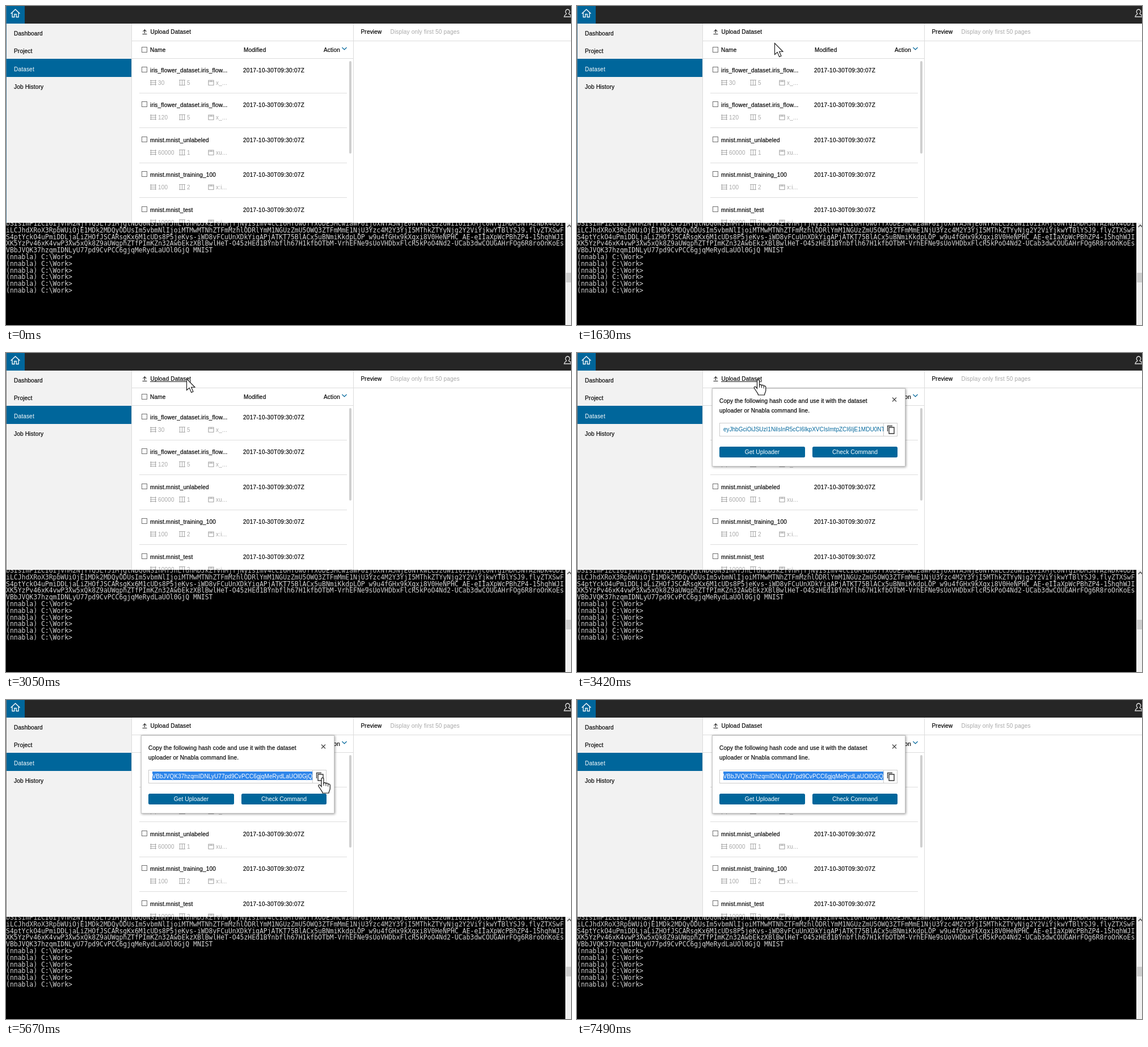
An HTML page that plays this animation: 996x562 px, repeating every 8 s.

```html
<!DOCTYPE html>
<html lang="en">
<head>
<meta charset="utf-8">
<title>Dataset upload</title>
<style>
html, body { margin: 0; width: 100%; height: 100%; overflow: hidden; background: #000; }
svg { display: block; width: 996px; height: 562px; }
text { font: 10px "Liberation Sans", Arial, sans-serif; white-space: pre; stroke-width: .2px; }
.ui { fill: #000; stroke: #000; letter-spacing: .2px; }
.name { fill: #000; stroke: #000; letter-spacing: .2px; }
.date { fill: #000; stroke: #000; letter-spacing: .29px; }
.meta { fill: #a8a8a8; letter-spacing: .2px; }
.white { fill: #fff; letter-spacing: .2px; }
.btn { fill: #fff; font-size: 10.35px; text-anchor: middle; }
.hash { fill: #00669b; }
.picked { fill: #fff; text-anchor: end; letter-spacing: .08px; }
.term { fill: #d6d6d6; font: 11.43px "DejaVu Sans Mono", monospace; }
</style>
</head>
<body>
<svg id="stage" viewBox="0 0 996 562"></svg>
<script>
const LOOP = 8000, BLUE = '#00669b';

const rect = (x, y, w, h, fill, more = '') =>
  `<rect x="${x}" y="${y}" width="${w}" height="${h}" fill="${fill}" ${more}/>`;
const line = (d, color, width = 1) =>
  `<path d="${d}" fill="none" stroke="${color}" stroke-width="${width}"/>`;
const text = (x, y, cls, s) => `<text x="${x}" y="${y}" class="${cls}">${s}</text>`;
const group = (id, body, more = '') => `<g id="${id}" ${more}>${body}</g>`;
const box = (x, y) => rect(x + .5, y + .5, 9, 9, '#fff', 'stroke="#707070"');

const prompt = '(nnabla) C:\\Work&gt;';
const output = [
  'bSIsImF1ZCI6IjVhM2NjYTQ5LTJiMjgtNDQ0NSIhMTJhLTdhMDJkZTVhMjTjNyIsImV4cCI6MTUwOTYxODE5MCwiaWF0IjoxNTA5NjE0NTkwLCJzdWIiOiIxMjc0NTg1MDM3NTA2NDk4ODI',
  'iLCJhdXRoX3RpbWUiOjE1MDk2MDQyODUsIm5vbmNlIjoiMTMwMTNhZTFmMzhlODRlYmM1NGUzZmU5OWQ3ZTFmMmE1NjU3Yzc4M2Y3YjI5MThkZTYyNjg2Y2ViYjkwYTBlYSJ9.flyZTXSwF',
  'S4ptYckO4uPmiDDLjaLiZHOfJSCARsgKx6M1cUDs8P5jeKvs-iWD8vFCuUnXDkYigAPjATKT75BlACx5uBNmiKkdpLOP_w9u4fGHx9kXqxi8V0HeNPHC_AE-eIIaXpWcPBhZP4-1ShqhWJI',
  'XK5YzPv46xK4vwP3Xw5xQk8Z9aUWqphZTfPImKZn32AwbEkzXBlBwlHeT-O45zHEd1BYnbflh67H1kfbOTbM-VrhEFNe9sUoVHDbxFlcR5kPoO4Nd2-UCab3dwCOUGAHrFOg6R8roOnKoEs',
  'VBbJVQK37hzqmIDNLyU77pd9CvPCC6gjqMeRydLaUOl0GjQ MNIST',
  ...Array(6).fill(prompt)
];
const rows = [
  ['iris_flower_dataset.iris_flow...', '30', '5', 'x_...'],
  ['iris_flower_dataset.iris_flow...', '120', '5', 'x_...'],
  ['mnist.mnist_unlabeled', '60000', '1', 'xu...'],
  ['mnist.mnist_training_100', '100', '2', 'x:i...'],
  ['mnist.mnist_test', '10000', '2', 'x:i...']
];
const ROW = 61.4;

function terminal() {
  return rect(0, 382, 996, 180, '#000') +
    output.map((s, i) => text(0, Math.round(387 + 11.8 * i), 'term', s)).join('') +
    rect(986, 382, 10, 180, '#f0f0f0') + rect(987, 470, 9, 17, '#cdcdcd') +
    line('M989.5 389.5l3.5-3.5l3.5 3.5', '#555', 1.6);
}

function datasetRow([name, count, columns, kind], i) {
  const icon = '#a8a8a8';
  return `<g transform="translate(0 ${Math.round(i * ROW)})">` +
    box(239, 107) + text(254, 117, 'name', name) + text(418, 117, 'date', '2017-10-30T09:30:07Z') +
    line('M255.5 130v10M263.5 130v10M254 131.5h11M254 135h11M254 138.5h11', icon) +
    line('M305 130.5h11M305 139.5h11M306.5 130v10M310.5 130v10M314.5 130v10', icon) +
    line('M357 131h9v8.5h-9zM357 133h9M361.5 131v3', icon, 1.2) +
    text(268, 139, 'meta', count) + text(319, 139, 'meta', columns) + text(370, 139, 'meta', kind) +
    line('M235 153.5H601', '#dedede') + '</g>';
}

function browser() {
  const menu = ['Dashboard', 'Project', 'Dataset', 'Job History'];
  return rect(0, 0, 996, 383, '#fff') + rect(0, 31, 221, 352, '#f2f2f2') +
    rect(0, 0, 996, 31, '#262626') + rect(0, 0, 33, 31, BLUE) +
    line('M8.5 13.5L16.5 6L24.5 13.5M11 12v7.5h3.8v-5h3.4v5H22V12', '#fff', 1.3) +
    line('M990 6a3.7 4 0 0 1 2 7.3c0 2 4.5 1.5 5 5.7h-13c.5-4.2 4-3.7 4-5.7a3.7 4 0 0 1 2-7.3z', '#ddd', 1.4) +
    rect(0, 93, 221, 32, BLUE) +
    menu.map((s, i) => text(14, 52 + Math.round(31.4 * i), i === 2 ? 'white' : 'ui', s)).join('') +
    line('M221.5 31V383M612.5 31V383M222 61.5H996M222 92.5H612', '#dcdcdc') +
    line('M244.5 48V42M241.5 45l3-3.3l3 3.3M240.5 49.5h8', '#222', 1.1) +
    text(254.5, 49, 'ui', 'Upload Dataset') + rect(254, 50, 72, 1, '#222', 'id="underline"') +
    text(625.5, 49, 'ui', 'Preview') + text(677.5, 49, 'meta', 'Display only first 50 pages') +
    box(239, 72) + text(254, 81, 'ui', 'Name') + text(419, 81, 'ui', 'Modified') + text(560, 81, 'ui', 'Action') +
    line('M592.5 73l4 4l4-4', BLUE, 1.2) +
    rect(235, 0, 366, 60.5, '#f0f0f0', 'id="hover"') +
    rows.map(datasetRow).join('') +
    group('trash', line('M584 355.5h12M588 355v-2h4v2M585.5 356v11.5h9V356M588 358.5v6.5M590 358.5v6.5M592 358.5v6.5', '#444', 1.2)) +
    rect(605, 97, 4, 163, '#cfcfcf', 'rx="2"') +
    rect(0, 0, 1, 383, '#4d7891', 'id="edge"');
}

function popup() {
  const button = (x, w, s) => rect(x, 165, w, 19, BLUE, 'rx="2.5"') + text(x + w / 2, 178, 'btn', s);
  return rect(238.5, 62.5, 340, 137, '#fff', 'stroke="#c4c4c4" style="filter:drop-shadow(1px 1px 2px #0006)"') +
    text(251, 87.5, 'ui', 'Copy the following hash code and use it with the dataset') +
    text(251, 105, 'ui', 'uploader or Nnabla command line.') +
    line('M556 78.5l7 7M563 78.5l-7 7', '#444', 1.2) +
    rect(251.5, 123.5, 313, 23, '#fff', 'stroke="#ccc"') + line('M540.5 124v23', '#ccc') +
    '<g clip-path="url(#field)">' +
    group('plain', text(258, 137.5, 'hash', 'eyJhbGciOiJSUzI1NiIsInR5cCI6IkpXVCIsImtpZCI6IjE1MDU0NT')) +
    group('selected', rect(258, 126, 282, 15, '#2f86ea') +
      text(540, 137.5, 'picked', 'VBbJVQK37hzqmIDNLyU77pd9CvPCC6gjqMeRydLaUOl0GjQ')) + '</g>' +
    rect(544, 126, 18, 18, '#e3eefa', 'id="focus" stroke="#73a9dc" stroke-width="2"') +
    line('M547.5 138V128.5h8.5', '#333', 1.3) + line('M550 131h9v11h-9z', '#333', 1.4) +
    button(251, 151, 'Get Uploader') + button(415, 150, 'Check Command');
}

const arrow = '<path d="M.5.5V20.5L5.2 16.3L8.7 24.5L12 23L8.6 15.3H15z" fill="#fff" stroke="#111" stroke-width="1.1"/>';
const hand = '<path d="M-2 2C-2-.6 2-.6 2 2V9.5C3 8 5.5 8.3 6 10C7.5 8.8 9.5 9.5 9.7 11.2C11.5 10.5 13.3 11.5 13.3 13.5V19C13.3 22 11 23.5 11 27H0C0 24-2.5 22.5-4 19.5L-7 15C-8 12.5-5.5 11.5-4 13L-2 15.5z" fill="#fff" stroke="#111" stroke-width="1.2"/>' +
  line('M2 9v5M6 10v4.5M9.7 11.5v4', '#111');

document.getElementById('stage').innerHTML =
  `<defs><clipPath id="field"><path d="M258 124h282v23h-282z"/></clipPath>
   <clipPath id="page"><path d="M0 0h996v382h-996z"/></clipPath>
   <linearGradient id="fade" x2="0" y2="1"><stop stop-opacity=".12"/><stop offset="1" stop-opacity="0"/></linearGradient></defs>` +
  terminal() + rect(0, 382, 986, 23, 'url(#fade)', 'id="shade"') +
  group('window', browser() + group('popup', popup()), 'clip-path="url(#page)"') +
  group('dots', '<circle id="blue" cy="190.5" r="10" fill="#7bafd0"/><circle id="red" cy="190.5" r="10" fill="#d6826f"/>') +
  group('arrow', arrow) + group('hand', hand);

// time, x, y, shape
const pointer = [
  [0], [810, 845, 512, 'arrow'], [1010, 745, 422, 'arrow'], [1220, 565, 260, 'arrow'],
  [1430, 420, 130, 'arrow'], [1630, 348, 65, 'arrow'], [1810, 330, 51, 'arrow'],
  [2020, 318, 45, 'arrow'], [3230, 319.5, 47, 'hand'],
  [3850, 340, 55, 'arrow'], [4060, 395, 78, 'arrow'], [4270, 470, 108, 'arrow'],
  [4460, 525, 128, 'arrow'], [4660, 553, 136, 'hand'], [4850, 558, 137, 'hand'],
  [6100, 555, 160, 'arrow'], [6300, 543, 240, 'hand'], [6490, 526, 341, 'hand'],
  [6710, 504, 430, 'arrow'], [6900, 491, 492, 'arrow'], [7100, 484, 522, 'arrow'],
  [7310, 476, 544, 'arrow'], [7490]
];
// time, half distance between the dots, opacity
const loader = [[0, 0, 0], [2230, 8, .5], [2440, 16, 1], [2630, 4, 1], [2840, -16, 1], [3050, 0, 0]];

const at = (table, t) => table.findLast(step => step[0] <= t);
const el = id => document.getElementById(id);
const show = (id, on) => { el(id).style.opacity = +on; };
const move = (id, x, y) => el(id).setAttribute('transform', `translate(${x} ${y})`);

function draw(t) {
  const [, x, y, shape] = at(pointer, t);
  for (const id of ['arrow', 'hand']) {
    show(id, shape === id);
    if (shape === id) move(id, x, y);
  }
  const onRow = shape === 'hand' && y > 200;
  show('hover', onRow);
  show('trash', onRow);
  if (onRow) {
    const row = Math.floor((y - 92.5) / ROW);
    move('hover', 0, 93 + row * ROW);
    move('trash', 0, (row - 4) * ROW);
  }
  const [, gap, alpha] = at(loader, t);
  show('dots', alpha);
  el('blue').setAttribute('cx', 501.3 - gap);
  el('red').setAttribute('cx', 501.3 + gap);

  show('underline', t >= 2020 && t < 3850);
  show('shade', t >= 2020);
  el('edge').setAttribute('fill', t < 2020 ? '#4d7891' : '#777');
  show('popup', t < 3230 ? 0 : t < 3420 ? .6 : 1);
  show('focus', t >= 4850 && t < 5670);
  show('plain', t < 5670);
  show('selected', t >= 5670);
}

const start = performance.now();
function tick() {
  draw((performance.now() - start) % LOOP);
  requestAnimationFrame(tick);
}
tick();
</script>
</body>
</html>
```
